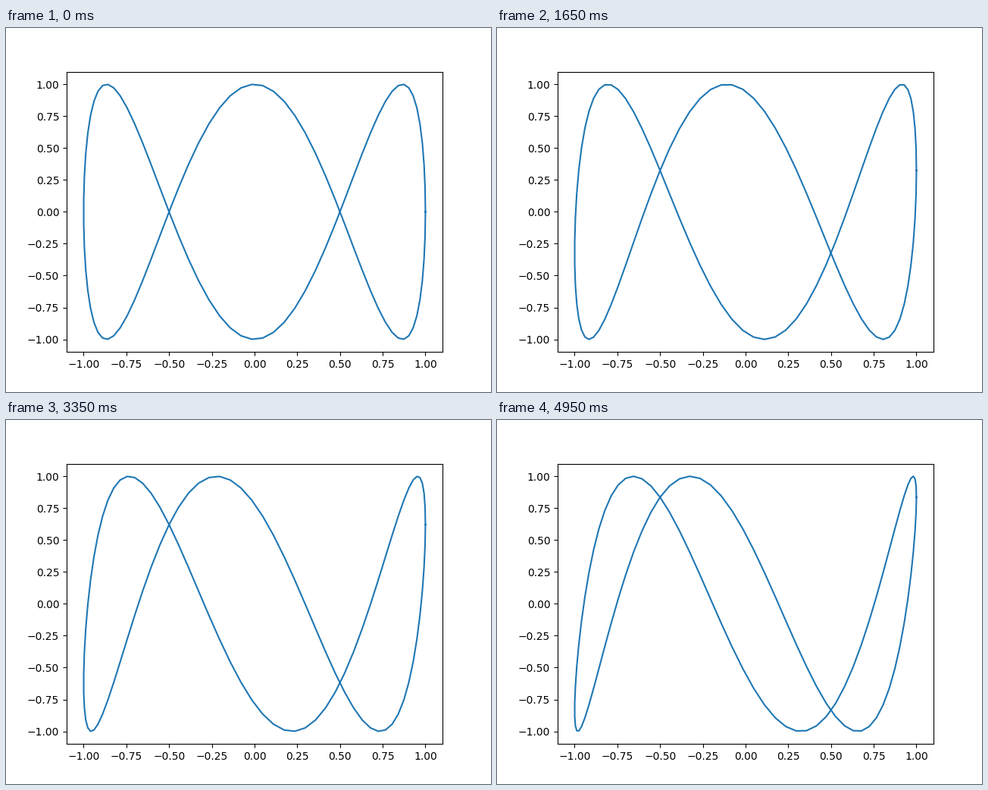
A matplotlib script for the animation above (5000 ms loop, 640x480 px).

```python
import numpy as np
import matplotlib.pyplot as plt
from matplotlib.animation import FuncAnimation

FRAMES = 100
INTERVAL = 50       # ms
PHASE_STEP = 0.01   # radians per frame

t = np.linspace(0, 2 * np.pi, 100)


def wave(frame):
    return np.sin(3 * t + PHASE_STEP * frame)


fig, ax = plt.subplots(figsize=(6.4, 4.8), dpi=100)
line, = ax.plot(np.cos(t), wave(0))


def update(frame):
    line.set_ydata(wave(frame))
    return line,


anim = FuncAnimation(fig, update, frames=FRAMES, interval=INTERVAL,
                     repeat=True, repeat_delay=0)

plt.show()
```
